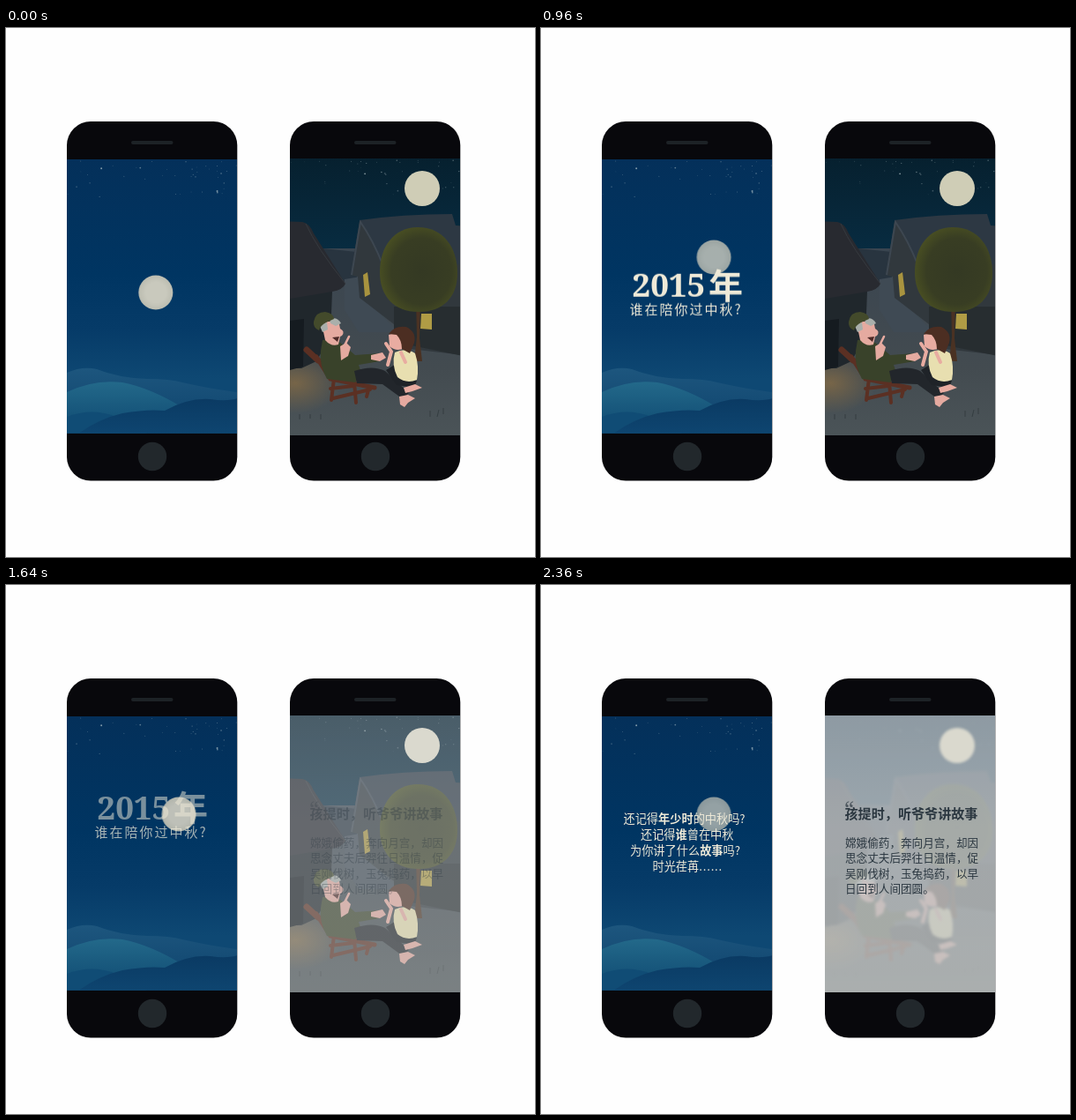
Recreate the animation shown at these times as an HTML page. Size 600 by 600 pixels, loop 2900 ms.

```html
<!DOCTYPE html>
<html lang="zh-CN">
<head>
<meta charset="utf-8">
<title>中秋</title>
<style>
html, body { margin: 0; width: 100%; height: 100%; overflow: hidden; background: #fefefe; }
svg { display: block; width: 100vw; height: 100vh; }
text { font-family: "Noto Sans CJK SC", "Noto Sans CJK", sans-serif; white-space: pre; }
.num { font: 700 37px "Noto Serif", serif; }
.quote { font: 24px "Noto Serif", serif; }
.cream { fill: #efead8; }
.ink { fill: #2b3740; }
.m { font-weight: 500; }
.b { font-weight: 700; }

#moon, #title, #year, #sub, #story, #scene, #veil, #tale, #glow { animation: 2.9s linear infinite; }
#moon { animation-name: rise, dim; }
#title { animation-name: pass; }
#year { animation-name: yearFade; }
#sub { animation-name: subFade; }
#story { animation-name: settle, storyFade; }
#scene { animation-name: soften; }
#glow { animation-name: soften, whiten; }
#veil { animation-name: mist; }
#tale { animation-name: taleFade; }

@keyframes rise {
  0% { transform: translate(0, 0); }
  31%, 100% { transform: translate(26.3px, -40px); }
}
@keyframes dim {
  0%, 18% { opacity: 1; }
  31% { opacity: .84; }
  45.5% { opacity: .78; }
  56.5%, 67% { opacity: .95; }
  81.4%, 100% { opacity: .74; }
}
@keyframes pass {
  0%, 19.3% { transform: translateY(34px); }
  37.9%, 52.4% { transform: translateY(0); }
  60.7%, 100% { transform: translateY(-60px); }
}
@keyframes yearFade {
  0%, 19.3% { opacity: 0; }
  22.1% { opacity: .29; }
  29.7%, 52.4% { opacity: 1; }
  56.5% { opacity: .52; }
  61%, 100% { opacity: 0; }
}
@keyframes subFade {
  0%, 19.3% { opacity: 0; }
  22.1% { opacity: .29; }
  29.7%, 53.8% { opacity: 1; }
  56.5% { opacity: .72; }
  62%, 100% { opacity: 0; }
}
@keyframes settle {
  0%, 63.4% { transform: translateY(19px); }
  66.2% { transform: translateY(16px); }
  81.4%, 100% { transform: translateY(0); }
}
@keyframes storyFade {
  0%, 63% { opacity: 0; }
  66.2% { opacity: .36; }
  73.5%, 100% { opacity: 1; }
}
@keyframes soften {
  0%, 45.5% { filter: blur(0); }
  56.5% { filter: blur(.5px); }
  66.2% { filter: blur(1.3px); }
  77.2%, 100% { filter: blur(1.8px); }
}
@keyframes whiten {
  0%, 40% { fill: #cfcdb6; }
  56.5%, 100% { fill: #dad9ce; }
}
@keyframes mist {
  0%, 40% { opacity: 0; }
  45.5% { opacity: .05; }
  56.5% { opacity: .4; }
  66.2% { opacity: .71; }
  77.2%, 100% { opacity: .8; }
}
@keyframes taleFade {
  0%, 53% { opacity: 0; }
  56.5% { opacity: .34; }
  66.2% { opacity: .82; }
  73%, 100% { opacity: 1; }
}
</style>
</head>
<body>
<svg viewBox="0 0 600 600">
  <defs>
    <linearGradient id="night" x2="0" y2="1">
      <stop offset="0" stop-color="#04305a"/>
      <stop offset=".42" stop-color="#003562"/>
      <stop offset=".62" stop-color="#063b68"/>
      <stop offset=".8" stop-color="#0e4873"/>
    </linearGradient>
    <linearGradient id="teal" x2="0" y2="1">
      <stop offset="0" stop-color="#23698a"/>
      <stop offset="1" stop-color="#0e4870"/>
    </linearGradient>
    <linearGradient id="ridge" x2="0" y2="1">
      <stop offset="0" stop-color="#1d567e"/>
      <stop offset="1" stop-color="#0d426c"/>
    </linearGradient>
    <linearGradient id="front" x2="0" y2="1">
      <stop offset="0" stop-color="#0a3a63"/>
      <stop offset="1" stop-color="#0e4570"/>
    </linearGradient>
    <linearGradient id="dusk" x2="0" y2="1">
      <stop offset="0" stop-color="#061f2d"/>
      <stop offset="1" stop-color="#082d43"/>
    </linearGradient>
    <linearGradient id="ground" x2="0" y2="1">
      <stop offset="0" stop-color="#3a4550"/>
      <stop offset=".6" stop-color="#434b50"/>
      <stop offset="1" stop-color="#4c5559"/>
    </linearGradient>
    <linearGradient id="fog" x2="0" y2="1">
      <stop offset="0" stop-color="#b0b9c0"/>
      <stop offset=".4" stop-color="#c1c6c9"/>
      <stop offset="1" stop-color="#c2c5c4"/>
    </linearGradient>
    <radialGradient id="leaf" cx=".54" cy=".52" r=".56">
      <stop offset="0" stop-color="#343923"/>
      <stop offset=".7" stop-color="#383d23"/>
      <stop offset="1" stop-color="#494f22"/>
    </radialGradient>
    <radialGradient id="lamp">
      <stop offset="0" stop-color="#776548"/>
      <stop offset="1" stop-color="#776548" stop-opacity="0"/>
    </radialGradient>
    <radialGradient id="pale">
      <stop offset=".6" stop-color="#c9c9bd"/>
      <stop offset="1" stop-color="#bcbdb1"/>
    </radialGradient>
    <clipPath id="left"><rect x="69" y="149" width="193" height="310.5"/></clipPath>
    <clipPath id="right"><rect x="322" y="148" width="193" height="314"/></clipPath>
    <g id="phone">
      <rect x="69" y="106" width="193.3" height="407.5" rx="27" fill="#08080c"/>
      <rect x="142" y="128" width="47.5" height="4" rx="2" fill="#1d2226"/>
      <circle cx="166" cy="486" r="16.2" fill="#22282c"/>
    </g>
  </defs>

  <use href="#phone"/>
  <use href="#phone" x="253"/>

  <g clip-path="url(#left)">
    <rect x="69" y="149" width="194" height="311" fill="url(#night)"/>
    <g id="starsA"/>
    <path fill="url(#ridge)" d="M69 391Q87 383 103 387Q128 397 160 398Q186 398 200 402Q235 410 263 413V460H69Z"/>
    <path fill="url(#teal)" d="M69 413Q100 398 132 402Q164 408 203 432L263 450V460H69Z"/>
    <path fill="#104c75" d="M69 441Q98 430 125 441L160 460H69Z"/>
    <path fill="url(#front)" d="M82 460Q106 443 132 437Q160 432 180 434Q207 419 232 421Q250 424 263 420V460Z"/>
    <circle id="moon" cx="169.8" cy="300" r="19.5" fill="url(#pale)"/>
    <g id="title" class="cream">
      <g id="year">
        <text class="num" x="103.5" y="296">2015</text>
        <text class="b" x="190" y="297.5" font-size="39">年</text>
      </g>
      <text id="sub" class="m" x="100.5" y="316" font-size="15" letter-spacing="2">谁在陪你过中秋?</text>
    </g>
    <g id="story" class="cream" font-size="13.2">
      <text class="m" x="93.5" y="270">还记得<tspan class="b">年少时</tspan>的中秋吗?</text>
      <text class="m" x="113" y="288">还记得<tspan class="b">谁</tspan>曾在中秋</text>
      <text class="m" x="101" y="306">为你讲了什么<tspan class="b">故事</tspan>吗?</text>
      <text class="m" x="126.5" y="324">时光荏苒<tspan letter-spacing=".8">......</tspan></text>
    </g>
  </g>

  <g clip-path="url(#right)">
    <g id="scene">
      <rect x="310" y="136" width="218" height="130" fill="url(#dusk)"/>
      <g id="starsB"/>
      <rect x="310" y="250" width="218" height="226" fill="url(#ground)"/>
      <path fill="#28343f" d="M350 249L398 254V288H350Z"/>
      <path fill="#3f4a54" d="M384 285L402 282L420 320L445 345L400 345L384 320Z"/>
      <ellipse cx="328" cy="403" rx="52" ry="34" fill="url(#lamp)"/>

      <!-- left house -->
      <path fill="#20272c" d="M310 300L370 298L368 350L352 378L335 386L310 386Z"/>
      <path fill="#151b20" d="M322 332L338 330L337 384L322 388Z"/>
      <path fill="#282a30" d="M310 219L336 220Q344 221 349 233L385 290Q382 297 370 299L310 309Z"/>
      <path fill="none" stroke="#363a3f" d="M340 222Q352 249 385 290"/>

      <!-- right house -->
      <path fill="#31383d" d="M401 219L391 280L399 282L401 306L440 336V362L528 372V225Z"/>
      <path fill="#2d3843" d="M401 218Q450 211 506 211L510 224L528 228V268L430 270L411 232Z"/>
      <path fill="none" stroke="#3d4751" stroke-width="2" d="M392 280L402 220Q416 240 428 270"/>
      <path fill="#272d30" d="M440 316H528V374L440 356Z"/>
      <path fill="#a8933f" d="M405 280L410 277L413 302L407 305Z"/>
      <path fill="#b09c45" d="M471 324L483 324V342L470 341Z"/>

      <!-- tree -->
      <path fill="#4a3223" d="M465 308H470L469 352L472 378H463L466 350Z"/>
      <path fill="url(#leaf)" d="M467 226C496 226 512 249 512 278C512 305 496 322 468 322C440 322 424 304 424 277C424 248 440 226 467 226Z"/>

      <!-- chair -->
      <g fill="none" stroke="#5b3023" stroke-linecap="round">
        <path stroke-width="7" d="M341 365L354 377"/>
        <path stroke-width="5" d="M352 373L368 398L418 408"/>
        <path stroke-width="4" d="M372 398L369 422M395 402L397 425M412 407L409 418M368 409L394 406M371 420L413 410"/>
      </g>

      <!-- grandfather -->
      <path fill="#39422a" d="M359 354Q373 352 382 359L396 371L424 369V378L400 382L404 394L396 402L364 398Q355 382 357 366Z"/>
      <path fill="#22262b" d="M395 389Q416 382 430 389L457 414L449 420L427 404L398 403Z"/>
      <path fill="#e5aaa0" d="M358 335Q368 330 378 336L379 341Q385 344 381 349L379 350L377 359Q369 362 362 354Z"/>
      <path fill="#4e2a27" d="M370 351L378 350L376 356Z"/>
      <path fill="#a9afab" d="M367 330Q376 327 380 335L374 338L368 335Z"/>
      <path fill="#a9afab" d="M355 336L364 334L365 342L359 345Z"/>
      <path fill="#434a2b" d="M349 333Q351 322 362 322Q371 323 372 330L363 334Q357 337 355 343Q348 340 349 333Z"/>
      <path fill="none" stroke="#e5aaa0" stroke-width="2.6" stroke-linecap="round" d="M384 360L389 350"/>
      <path fill="#e5aaa0" d="M379 361L386 357L391 362L388 372L380 377Z"/>
      <path fill="#e5aaa0" d="M414 371L427 368L431 374L424 378L414 376Z"/>
      <path fill="#e5aaa0" d="M446 418L456 416L464 420L456 425L452 430L447 427Z"/>

      <!-- girl -->
      <path fill="#1f2328" d="M431 388L444 380L449 397L466 400L463 408L443 405Z"/>
      <path fill="#e8dfb0" d="M441 368Q453 362 464 369Q469 384 466 399Q454 404 444 396Q437 382 441 368Z"/>
      <path fill="#e8aca1" d="M434 348Q442 344 450 350L452 363Q443 368 435 361Z"/>
      <path fill="#4c2e22" d="M434 347Q441 337 454 339Q466 345 463 357L458 369L449 364Q449 354 443 348Z"/>
      <path fill="none" stroke="#e8aca1" stroke-width="4" stroke-linecap="round" d="M431 358L437 367L433 382M448 368L453 379"/>
      <path fill="#e8aca1" d="M451 408L464 404L472 408L461 412L453 414Z"/>
      <path fill="none" stroke="#343d41" d="M333 444v-6M345 443v-5M357 444v-6M481 441v-7M489 441l2-8M496 438v-7"/>
    </g>
    <rect id="veil" x="322" y="148" width="194" height="314" fill="url(#fog)"/>
    <circle id="glow" cx="472" cy="182" r="20"/>
    <g id="tale" class="ink">
      <text class="quote" x="344" y="262" opacity=".7">“</text>
      <text class="b" x="344.5" y="265.3" font-size="15.1">孩提时，听爷爷讲故事</text>
      <g class="m" font-size="12.6">
        <text x="345" y="296.5">嫦娥偷药，奔向月宫，却因</text>
        <text x="345" y="314">思念丈夫后羿往日温情，促</text>
        <text x="345" y="331.5">吴刚伐树，玉兔捣药，以早</text>
        <text x="345" y="349">日回到人间团圆。</text>
      </g>
    </g>
  </g>
</svg>
<script>
let seed = 7;
const rand = () => (seed = seed * 16807 % 2147483647) / 2147483647;

// stars thin out towards the horizon
function sprinkle(id, x, y, count) {
  const group = document.getElementById(id);
  for (let i = 0; i < count; i++) {
    const star = document.createElementNS("http://www.w3.org/2000/svg", "circle");
    const attrs = {
      cx: x + rand() * 192, cy: y + 42 * rand() ** 1.4,
      r: .4 + .6 * rand() ** 3, fill: "#c3d2d4", opacity: .2 + .45 * rand()
    };
    for (const key in attrs) star.setAttribute(key, attrs[key]);
    group.append(star);
  }
}
sprinkle("starsA", 70, 151, 42);
sprinkle("starsB", 323, 150, 42);
</script>
</body>
</html>
```
